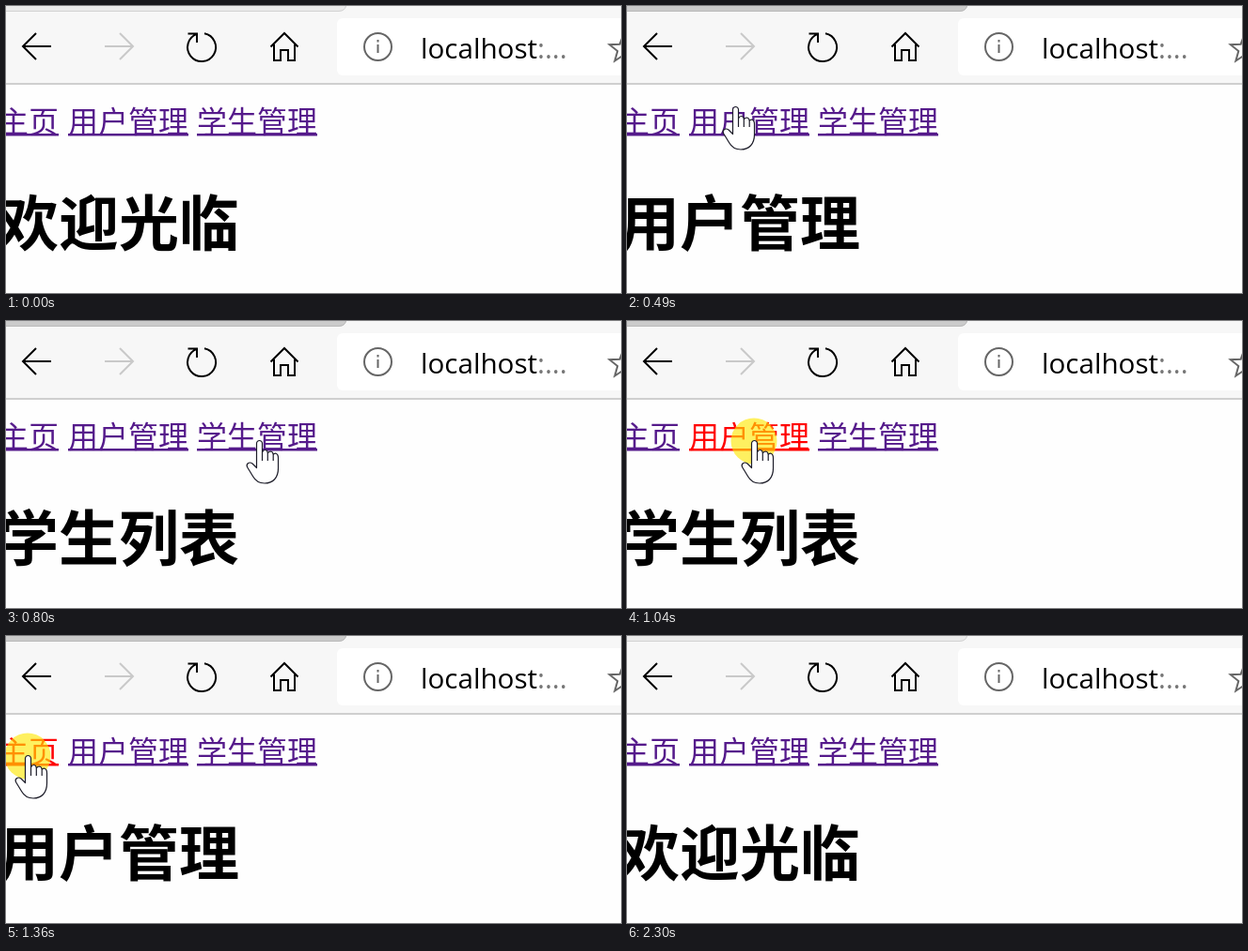
An HTML page that plays this animation: 654 px wide and 306 px high, repeating every 2390 ms.

```html
<!DOCTYPE html>
<html lang="zh-CN">
<head>
<meta charset="utf-8">
<title>主页</title>
<style>
  html, body { margin: 0; width: 100%; height: 100%; overflow: hidden; background: #fff; }
  svg { display: block; width: 100%; height: 100%; }
  .cjk { font-family: "Noto Sans CJK SC", "Noto Sans CJK", sans-serif; }
  .link { font-size: 32px; font-weight: 350; }
  .title { font-size: 64px; font-weight: 700; }
  .url { font: 29.6px "Open Sans", "Noto Sans", sans-serif; }
  .icon { fill: none; stroke: #000; stroke-width: 2; }
  .icon.dim { stroke: #c9c9c9; }
  .icon.gray { stroke: #666; }
  .cursor { fill: #fff; stroke: #1c1c28; stroke-width: 1.2; stroke-linejoin: round; }
</style>
</head>
<body>
<svg viewBox="0 0 654 306">
  <rect width="654" height="306" fill="#fefefe"/>
  <rect width="654" height="83" fill="#f7f7f7"/>
  <path id="tab" d="M0 0H362Q360.500 5.500 354 6H0Z"/>
  <path id="tabEdge" d="M0 5.500H354Q360.500 5 361.500 0" fill="none"/>
  <rect y="82" width="654" height="2" fill="#cfcfcf"/>
  <rect x="352" y="13" width="310" height="61" rx="6" fill="#fff"/>

  <path class="icon" d="M48 43H18M32 29L18 43L32 57"/>
  <path class="icon dim" d="M105 43H135M121 29L135 43L121 57"/>
  <path class="icon" d="M211 29.300A15 15 0 1 1 203 29.900M193.500 29.500H203V39"/>
  <path class="icon" d="M281.500 43.500L296 29L310.500 43.500M285 41V58H292V47H300V58H307V41"/>
  <g class="icon gray">
    <circle cx="395.500" cy="43.500" r="14.500"/>
    <path d="M395.500 41V50M395.500 36V38.500"/>
    <path id="star"/>
  </g>
  <text class="url" x="441" y="56">localhost<tspan fill="#767676">:...</tspan></text>

  <g id="links" class="cjk link"></g>
  <text id="title" class="cjk title" x="-8" y="255"></text>

  <circle id="glow" r="24.500" fill="#ffe800" opacity=".62"/>
  <path id="arrow" class="cursor" d="M.5 .5V33L8 26L13 37.500L17.500 35.500L12.500 24.500H23Z"/>
  <path id="hand" class="cursor" d="M-2.500 2.500A3 3 0 0 1 3.500 2.500V12Q4.500 9.500 6.500 9.500Q9 9.500 9.300 13Q10.500 11 12.500 11Q15 11.300 15.200 14.500Q16.200 13 18 13.200Q20.500 14 20.500 18V29C20.500 39 15 45 6 45C0 45 -4 42 -6.500 37.500L-12.300 28C-14.200 24.500 -10.500 21.500 -7 24L-2.500 28.500ZM3.500 12V21M9.300 13V21M15.200 14.500V21"/>
</svg>
<script>
const LOOP = 2390;
const $ = id => document.getElementById(id);
const HOME = 0, USERS = 1, STUDENTS = 2;
const titles = ['欢迎光临', '用户管理', '学生列表'];

// Each step: start, title, cursor shape, x, y, pressed
const steps = [
  [0, HOME],
  [70, HOME, 'arrow', 85, 164],
  [120, HOME, 'arrow', 101, 162],
  [260, HOME, 'hand', 112, 122],
  [340, HOME, 'hand', 115, 108],
  [410, HOME, 'hand', 115, 108, true],
  [490, USERS, 'hand', 115, 108],
  [570, USERS, 'hand', 205, 122],
  [640, USERS, 'hand', 267, 128, true],
  [720, STUDENTS, 'hand', 267, 128],
  [800, STUDENTS, 'hand', 269, 128],
  [880, STUDENTS, 'hand', 215, 128],
  [960, STUDENTS, 'hand', 150, 128],
  [1040, STUDENTS, 'hand', 135, 128, true],
  [1130, USERS, 'hand', 135, 128],
  [1210, USERS, 'hand', 23, 128],
  [1360, USERS, 'hand', 23, 128, true],
  [1440, HOME, 'hand', 23, 128],
  [1520, HOME, 'arrow', 367, 260],
  [1600, HOME]
];

function svgEl(name, attrs, parent) {
  const el = document.createElementNS(parent.namespaceURI, name);
  for (const key in attrs) el.setAttribute(key, attrs[key]);
  return parent.appendChild(el);
}

const links = [['主页', -8], ['用户管理', 66], ['学生管理', 203]].map(([label, x]) => {
  const link = svgEl('g', {}, $('links'));
  svgEl('text', { x, y: 134.5 }, link).textContent = label;
  svgEl('rect', { x, y: 136, width: label.length * 32, height: 2.5 }, link);
  return { node: link, left: x, right: x + label.length * 32 };
});

const starPoints = Array.from({ length: 10 }, (_, i) => {
  const r = i % 2 ? 6.5 : 15.5, a = (i / 5 - 0.5) * Math.PI;
  return (656.5 + r * Math.cos(a)).toFixed(1) + ' ' + (46 + r * Math.sin(a)).toFixed(1);
});
$('star').setAttribute('d', 'M' + starPoints.join('L') + 'Z');

function show(id, visible, x, y) {
  $(id).setAttribute('display', visible ? 'inline' : 'none');
  if (visible) $(id).setAttribute('transform', `translate(${x} ${y})`);
}

function draw(t) {
  const [, page, shape, x, y, pressed] = steps.filter(s => s[0] <= t).pop();
  const focused = t >= 410 && t < 2300;
  $('tab').setAttribute('fill', focused ? '#cbcbcb' : '#ebebeb');
  $('tabEdge').setAttribute('stroke', focused ? '#b9b9b9' : '#d2d2d2');
  $('title').textContent = titles[page];
  for (const { node, left, right } of links) {
    node.setAttribute('fill', pressed && x >= left && x <= right ? '#f00' : '#551a8b');
  }
  show('arrow', shape === 'arrow', x, y);
  show('hand', shape === 'hand', x, y);
  show('glow', pressed, x, y);
}

const start = performance.now();
function tick() {
  draw((performance.now() - start) % LOOP);
  requestAnimationFrame(tick);
}
tick();
</script>
</body>
</html>
```
